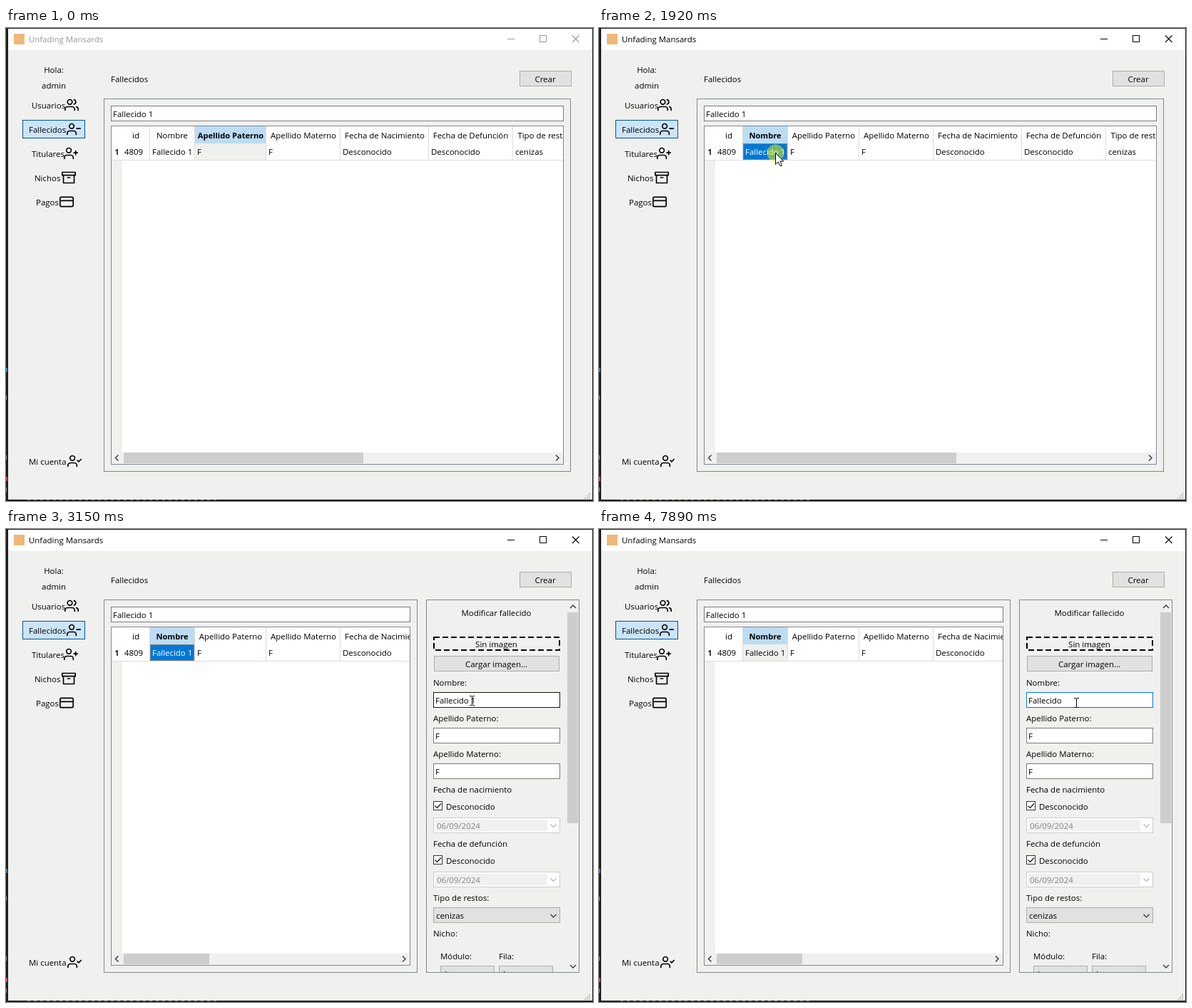
An HTML page with a canvas that plays this animation: 823 px wide and 664 px high, repeating every 8 s.

```html
<!DOCTYPE html>
<html lang="es">
<head>
<meta charset="utf-8">
<title>Fallecidos</title>
<style>
html, body { margin: 0; width: 100%; height: 100%; overflow: hidden; background: #1e1e1e; }
canvas { display: block; }
</style>
</head>
<body>
<canvas id="stage" width="823" height="664"></canvas>
<script>
const c = document.getElementById('stage').getContext('2d');
const LOOP = 8000, BG = '#f0f0ee', EDGE = '#7a7a7a', FRAME = '#828790', BLUE = '#0078d7';
const FAMILY = '"Open Sans", "Noto Sans", sans-serif';

function fill(x, y, r, b, color) {
  c.fillStyle = color;
  c.fillRect(x, y, r - x, b - y);
}

function box(x, y, r, b, color, border) {
  fill(x, y, r, b, border);
  fill(x + 1, y + 1, r - 1, b - 1, color);
}

function text(s, x, y, { color = '#000', align = 'left', bold = false } = {}) {
  c.font = bold ? `bold 11.1px ${FAMILY}` : `11.45px ${FAMILY}`;
  c.fillStyle = color;
  c.textAlign = align;
  c.fillText(s, x, y);
}

const mid = (s, x, y, opt) => text(s, x, y, { align: 'center', ...opt });

function line(color, width, ...p) {
  c.strokeStyle = color;
  c.lineWidth = width;
  c.beginPath();
  for (let i = 0; i < p.length; i += 2) c.lineTo(p[i], p[i + 1]);
  c.stroke();
}

function clipped(x, y, r, b, paint) {
  c.save();
  c.beginPath();
  c.rect(x, y, r - x, b - y);
  c.clip();
  paint();
  c.restore();
}

// Chevron centred on x, y, pointing along dx, dy
function chevron(x, y, dx, dy, color = '#404040', s = 4) {
  const h = s / 2;
  line(color, 1.5,
    x - dx * h + dy * s, y - dy * h + dx * s,
    x + dx * h, y + dy * h,
    x - dx * h - dy * s, y - dy * h - dx * s);
}

// Icons on a 24-unit grid
const person = 'M16 21v-2a4 4 0 0 0-4-4H5a4 4 0 0 0-4 4v2M4.5 7a4 4 0 1 0 8 0a4 4 0 1 0-8 0';
const icons = {
  users: 'M17 21v-2a4 4 0 0 0-4-4H5a4 4 0 0 0-4 4v2M5 7a4 4 0 1 0 8 0a4 4 0 1 0-8 0' +
    'M23 21v-2a4 4 0 0 0-3-3.87M16 3.13a4 4 0 0 1 0 7.75',
  minus: person + 'M23 11H17',
  plus: person + 'M20 8v6M23 11H17',
  check: person + 'M17 11l2 2 4-4',
  archive: 'M21 8v13H3V8M1 3h22v5H1zM10 12h4',
  card: 'M3 4h18a2 2 0 0 1 2 2v12a2 2 0 0 1-2 2H3a2 2 0 0 1-2-2V6a2 2 0 0 1 2-2zM1 10h22'
};

function icon(name, x, y) {
  c.save();
  c.translate(x, y);
  c.scale(20 / 24, 20 / 24);
  c.lineWidth = 2;
  c.lineCap = c.lineJoin = 'round';
  c.strokeStyle = '#000';
  c.stroke(new Path2D(icons[name]));
  c.restore();
}

const menu = [
  ['Usuarios', 36, 113, 'users', 82], ['Fallecidos', 32, 147, 'minus', 85],
  ['Titulares', 36, 181, 'plus', 81], ['Nichos', 40, 215, 'archive', 78],
  ['Pagos', 42, 249, 'card', 75], ['Mi cuenta', 32, 613, 'check', 86]
];

function drawWindow(active) {
  fill(0, 0, 823, 664, '#1e1e1e');
  fill(0, 477, 2, 483, '#3b78a8');
  for (const y of [516, 600, 645]) fill(0, y, 1, y + 6, '#8a8a8a');
  fill(0, 630, 2, 636, '#b04a55');
  for (let x = 30; x < 300; x += 9) fill(x, 662, x + 4, 663, '#777');
  fill(3, 1, 822, 31, '#fff');
  fill(3, 31, 822, 662, BG);

  const ink = active ? '#000' : '#999';
  fill(11, 8, 26, 23, '#f0b878');
  text('Unfading Mansards', 32, 20, { color: active ? '#000' : '#8f9a90' });
  fill(703, 15, 713, 16, ink);
  box(748, 10, 758, 20, '#fff', ink);
  line(ink, 1.1, 794, 10.5, 803.5, 20);
  line(ink, 1.1, 803.5, 10.5, 794, 20);
  for (let i = 0; i < 3; i++)
    for (let j = 2 - i; j < 3; j++)
      fill(811 + i * 3, 653 + j * 3, 813 + i * 3, 655 + j * 3, '#bfbfbf');

  mid('Hola:', 67, 63);
  mid('admin', 67, 85);
  box(23, 129, 111, 155, '#cce4f7', '#005499');
  for (const [label, x, y, name, ix] of menu) {
    text(label, x, y);
    icon(name, ix, y - 15);
  }
  text('Fallecidos', 147, 76);
  box(720, 60, 793, 82, '#e1e1e1', '#adadad');
  mid('Crear', 756, 76);
}

// title, left, right, title centre, cell value
const columns = [
  ['id', 163, 201, 182, '4809'], ['Nombre', 202, 264, 233, 'Fallecido 1'],
  ['Apellido Paterno', 265, 364, 315, 'F'], ['Apellido Materno', 365, 468, 417, 'F'],
  ['Fecha de Nacimiento', 469, 592, 531, 'Desconocido'],
  ['Fecha de Defunción', 593, 710, 651.5, 'Desconocido'],
  ['Tipo de restos', 711, 800, 755, 'cenizas']
];

function drawTable(right, current, focused) {
  box(137, 99, right + 10, 623, BG, FRAME);
  box(147, 109, right, 131, '#fff', EDGE);
  text('Fallecido 1', 150, 125);
  box(147, 137, right, 613, '#fff', FRAME);
  clipped(148, 138, right - 1, 612, () => {
    fill(148, 186, 163, 596, BG);
    fill(148, 185, right, 186, '#dcdcdc');
    mid('1', 155.5, 178, { bold: true, color: '#1a1a4a' });
    columns.forEach(([title, l, r, centre, value], i) => {
      const on = i === current, lit = on && focused;
      fill(r, 138, r + 1, 185, '#dcdcdc');
      if (on) {
        fill(l, 138, r, 162, '#bcdcf4');
        fill(l, 162, r, 185, lit ? BLUE : BG);
      }
      if (lit) {
        c.setLineDash([1, 1]);
        c.strokeStyle = '#ff8728';
        c.lineWidth = 1;
        c.strokeRect(l + .5, 162.5, r - l - 1, 22);
        c.setLineDash([]);
      }
      mid(title, centre, 155, { bold: on });
      text(value, l + 3, 178, { color: lit ? '#fff' : '#000' });
    });
    fill(148, 596, right, 612, '#f0f0f0');
    fill(165, 596, right > 700 ? 501 : 285, 611, '#cdcdcd');
    chevron(155.5, 603.5, -1, 0);
    chevron(right - 9, 603.5, 1, 0);
  });
}

function input(y, value, border = EDGE) {
  box(599, y, 777, y + 22, '#fff', border);
  text(value, 602, y + 16);
}

function dateGroup(label, y) {
  text(label, 599, y);
  box(599, y + 12, 612, y + 25, '#fff', '#333');
  line('#222', 1.4, 601.5, y + 18.5, 604.5, y + 21.5, 610, y + 15.5);
  text('Desconocido', 617, y + 24);
  box(599, y + 35, 777, y + 57, '#fff', '#ccc');
  fill(602, y + 38, 759, y + 54, BG);
  text('06/09/2024', 604, y + 51, { color: '#838380' });
  chevron(767.5, y + 46.5, 0, 1, '#bfbfbf');
}

function drawPanel(name, border) {
  box(589, 99, 804, 623, BG, FRAME);
  mid('Modificar fallecido', 687.5, 122);
  c.setLineDash([8, 4]);
  c.strokeStyle = '#000';
  c.lineWidth = 2;
  c.strokeRect(600, 152, 176, 18);
  c.setLineDash([]);
  mid('Sin imagen', 687.5, 166);
  box(600, 178, 776, 200, '#e1e1e1', '#adadad');
  mid('Cargar imagen...', 687.5, 194);
  text('Nombre:', 599, 220);
  input(229, name, border);
  text('Apellido Paterno:', 599, 270);
  input(279, 'F');
  text('Apellido Materno:', 599, 320);
  input(329, 'F');
  dateGroup('Fecha de nacimiento', 370);
  dateGroup('Fecha de defunción', 446);
  text('Tipo de restos:', 599, 522);
  box(599, 531, 777, 553, '#e1e1e1', '#adadad');
  text('cenizas', 603, 547);
  chevron(767.5, 543, 0, 1);
  text('Nicho:', 599, 572);
  text('Módulo:', 609, 604);
  text('Fila:', 691, 604);
  clipped(590, 600, 787, 622, () => {
    for (const x of [609, 691]) {
      box(x, 613, x + 76, 635, '#e1e1e1', '#adadad');
      text('A', x + 4, 629);
    }
  });
  fill(787, 100, 803, 622, '#f0f0f0');
  fill(787, 117, 802, 413, '#cdcdcd');
  chevron(795, 109, 0, -1);
  chevron(795, 614, 0, 1);
}

function drawArrow(x, y) {
  c.save();
  c.translate(x + .5, y + .5);
  c.fillStyle = '#fff';
  c.strokeStyle = '#000';
  c.lineWidth = 1;
  const shape = new Path2D('M0 0V16L3.7 12.5L6.4 18H8.6V16.5L6.5 11.5H11.3Z');
  c.fill(shape);
  c.stroke(shape);
  c.restore();
}

function drawBeam(x, y) {
  fill(x, y - 5, x + 1, y + 7, '#000');
  for (const d of [-6, 7]) {
    fill(x - 3, y + d, x, y + d + 1, '#000');
    fill(x + 1, y + d, x + 4, y + d + 1, '#000');
  }
}

// Pointer moves are sampled every 70 ms and slow down towards the end
function glide(t, start, end, [x0, y0], [x1, y1]) {
  const held = start + Math.floor((t - start) / 70 + .01) * 70;
  const p = t >= end ? 1 : Math.min(1, (held - start) / (end - start));
  const e = 1 - (1 - p) ** 2;
  return [Math.round(x0 + (x1 - x0) * e), Math.round(y0 + (y1 - y0) * e)];
}

function pointer(t) {
  if (t < 200) return null;
  if (t < 1170) return glide(t, 200, 970, [755, 601], [247, 176]);
  return glide(Math.max(t, 2520), 2520, 3300, [247, 175], [669, 243]);
}

// start time, field text, caret x
const edits = [
  [0, 'Fallecido 1', 658], [4300, 'Fallecido ', 652], [4570, 'Fallecido 2', 658],
  [6980, 'Fallecido ', 652], [7310, 'Fallecido', 649]
];
const blinks = [[3440, 3970], [4300, 5170], [5700, 6230], [6760, 7890]];
const during = (t, [a, b]) => t >= a && t < b;

function draw(t) {
  const open = t >= 2050, picked = t >= 1920, focus = t >= 3440;
  const at = pointer(t);
  const over = open && at && at[0] >= 599 && at[1] >= 229;

  drawWindow(picked);
  drawTable(open ? 567 : 782, picked ? 1 : 2, picked && !focus);
  if (open) {
    const [, name, caret] = edits.filter(e => t >= e[0]).pop();
    drawPanel(name, focus ? BLUE : over ? '#171717' : EDGE);
    if (blinks.some(b => during(t, b))) fill(caret, 232, caret + 1, 248, '#000');
  }
  if (during(t, [1850, 2120]) || during(t, [3370, 3570])) {
    c.fillStyle = 'rgba(255,255,0,.47)';
    c.beginPath();
    c.arc(at[0] + .5, at[1] + .5, 12, 0, 7);
    c.fill();
  }
  if (at) (over ? drawBeam : drawArrow)(...at);
}

const begin = performance.now();
function tick() {
  draw((performance.now() - begin) % LOOP);
  requestAnimationFrame(tick);
}
tick();
</script>
</body>
</html>
```
